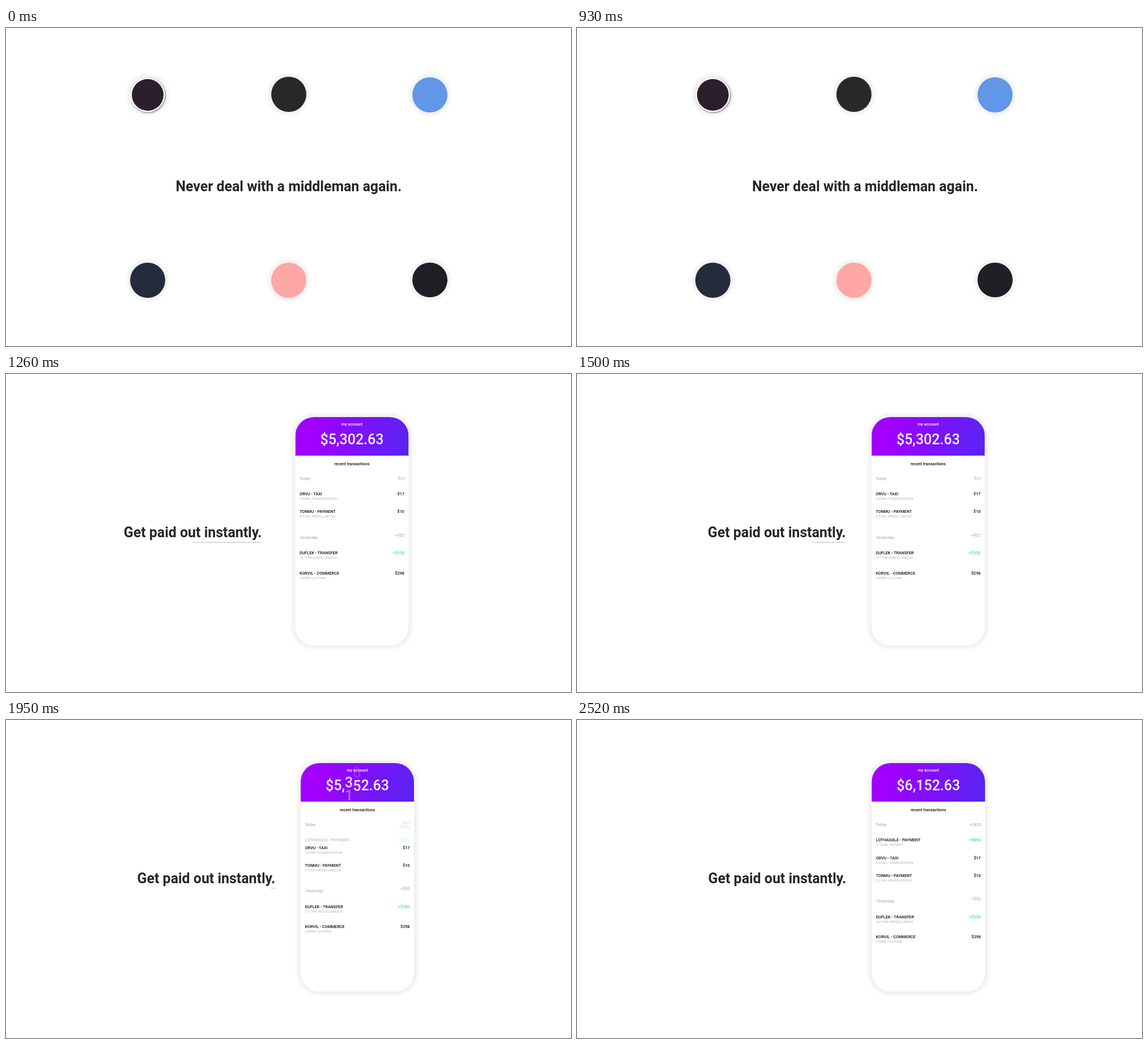
An HTML page that plays this animation: 997x561 px, repeating every 2550 ms.

```html
<!DOCTYPE html>
<html lang="en">
<head>
<meta charset="utf-8">
<title>Get paid out instantly</title>
<style>
  html, body { margin: 0; width: 100%; height: 100%; overflow: hidden; background: #fff; }
  #stage { position: relative; width: 997px; height: 561px; overflow: hidden; font-family: Roboto, sans-serif; }
  #stage div { position: absolute; left: 0; top: 0; }
  .text { white-space: pre; line-height: normal; font-size: 7.2px; font-weight: 500; color: #111; }
  #stage .title { font-size: 24.9px; font-weight: 700; color: #262626; }
  #stage .balance { font-size: 25px; color: #fbf5ff; font-kerning: none; }
  .dim { color: #b4b4b4; }
  .gain { color: #3fe58c; }
  .white { color: #fff; }
  #stage .note { font-size: 5.2px; font-weight: 400; color: #b0b0b0; }
  .badge { border-radius: 50%; box-shadow: 0 0 3px 5px rgba(0,0,0,.03), 0 0 4px 8px rgba(0,0,0,.025); }
  .badge.ring {
    box-shadow: 0 0 0 2.5px #fff, 1px 1px 2px 3px rgba(0,0,0,.4),
      0 0 3px 8px rgba(0,0,0,.03), 0 0 4px 11px rgba(0,0,0,.025);
  }
  #stage .card {
    left: 519.6px; top: 76px; width: 200.4px; height: 403px; border-radius: 33px;
    background: #fff; overflow: hidden; box-shadow: 0 0 9px 5px rgba(0,0,0,.075);
  }
  .head { width: 100%; height: 67.5px; background: linear-gradient(105deg, #a100ff 18%, #5526f2 100%); }
  #stage .line { left: 231.3px; top: 295.6px; width: 244px; height: 2px; background: #dadada; transform-origin: right; }
  .slot { position: relative; display: inline-block; }
  .slot span { display: inline-block; }
  .slot span + span { position: absolute; left: 0; top: 0; }
</style>
</head>
<body>
<div id="stage"></div>
<script>
const LOOP = 2550, CUT = 1080;
const stage = document.getElementById('stage');

function add(parent, cls, html = '') {
  const el = document.createElement('div');
  el.className = cls;
  el.innerHTML = html;
  parent.append(el);
  return el;
}

// Places text by its baseline; align is 0 (left), 50 (centre) or 100 (right).
function text(parent, str, x, y, cls = '', align = 0) {
  const el = add(parent, 'text ' + cls, str);
  const size = parseFloat(getComputedStyle(el).fontSize);
  const top = y - Math.round(size * 0.9277);
  el.style.transform = `translate(${x}px, ${top}px) translateX(-${align}%)`;
  return el;
}

function row(parent, y, name, note, amount, cls = '') {
  text(parent, name, 527.5, y);
  text(parent, note, 527.8, y + 8, 'note');
  text(parent, amount, 712.4, y, cls, 100);
}

// First scene
const intro = add(stage, '');
const badges = add(intro, '');
[
  [249.7, 117.8, 28.2, '#2b1f2b', 'ring'],
  [498.8, 116.8, 31, '#282828'],
  [748, 117.5, 31, '#6296e8'],
  [250.2, 445, 31, '#242b3b'],
  [498.8, 445, 31, '#ffa6a6'],
  [748, 444.6, 30.8, '#1e2026']
].forEach(([x, y, r, color, cls = '']) => {
  const el = add(badges, 'badge ' + cls);
  Object.assign(el.style, {
    left: x - r + 'px', top: y - r + 'px',
    width: 2 * r + 'px', height: 2 * r + 'px', background: color
  });
});
const slogan = add(intro, '');
text(slogan, 'Never deal with a middleman again.', 498.8, 288, 'title', 50);

// Second scene
const payout = add(stage, '');
const claim = add(payout, '');
text(claim, 'Get paid out instantly.', 353.4, 288, 'title', 50);
const line = add(claim, 'line');

const phone = add(payout, '');
add(add(phone, 'card'), 'head');
text(phone, 'my account', 620, 90.5, 'white', 50);
text(phone, 'recent transactions', 620, 160.5, '', 50);

const slot = (a, b) => `<span class="slot"><span>${a}</span><span>${b}</span></span>`;
const balance = text(phone, `$${slot(5, 6)},${slot(3, 1)}${slot(0, 5)}2.63`, 620, 124, 'balance', 50);
const rolls = [...balance.querySelectorAll('.slot')].map((el, i) => ({
  digits: el.children, start: [1890, 1710, 1530][i]
}));

text(phone, 'Today', 527.2, 187, 'dim');
const oldSum = add(phone, ''), newSum = add(phone, '');
text(oldSum, '-$27', 713.6, 187, 'dim', 100);
text(newSum, '+$823', 713.6, 187, 'dim', 100);

const fresh = add(phone, '');
row(fresh, 214, 'LOTHAGGLE - PAYMENT', '11:09AM | PAYMENT', '+$850', 'gain');

const list = add(phone, '');
row(list, 214, 'ORVU - TAXI', '9:43AM | TRANSPORTATION', '$17');
row(list, 245, 'TONMU - PAYMENT', '8:31AM | MISCELLANEOUS', '$10');
text(list, 'Yesterday', 528, 290.5, 'dim');
text(list, '+$52', 712.4, 286.5, 'dim', 100);
row(list, 318, 'DUFLEK - TRANSFER', '10:17PM | MISCELLANEOUS', '+$350', 'gain');
row(list, 353.5, 'KORVIL - COMMERCE', '6:50PM | CLOTHING', '$298');

// Motion
const span = (t, start, length) => Math.min(1, Math.max(0, (t - start) / length));
const quartIn = u => u ** 4;
const rest = (u, power) => (1 - u) ** power;
const quartInOut = u => u < 0.5 ? 8 * u ** 4 : 1 - 8 * (1 - u) ** 4;
const moveX = (el, x) => { el.style.transform = `translateX(${x}px)`; };
const moveY = (el, y, alpha = 1) => {
  el.style.transform = `translateY(${y}px)`;
  el.style.opacity = alpha;
};

function draw(t) {
  const first = t < CUT;
  intro.style.display = first ? '' : 'none';
  payout.style.display = first ? 'none' : '';

  const leave = quartIn(span(t, 570, 510));
  moveX(badges, -41 * leave);
  moveX(slogan, 38 * leave);

  const enter = rest(span(t, CUT, 600), 4);
  moveX(claim, -100 * enter);
  moveX(phone, -40 * enter);
  line.style.transform = `scaleX(${rest(span(t, 966, 1427), 3)})`;

  const p = quartInOut(span(t, 1517, 900));
  moveY(list, 31.6 * p);
  moveY(fresh, 0, p ** 1.6);
  moveY(oldSum, -7 * p, 1 - p);
  moveY(newSum, 7 * (1 - p), p);

  for (const { digits, start } of rolls) {
    const q = quartInOut(span(t, start, 600));
    moveY(digits[0], -23 * q, (1 - q) ** 0.7);
    moveY(digits[1], 23 * (1 - q), q ** 0.6);
  }
}

const begin = performance.now();
function tick() {
  draw((performance.now() - begin) % LOOP);
  requestAnimationFrame(tick);
}
tick();
</script>
</body>
</html>
```
